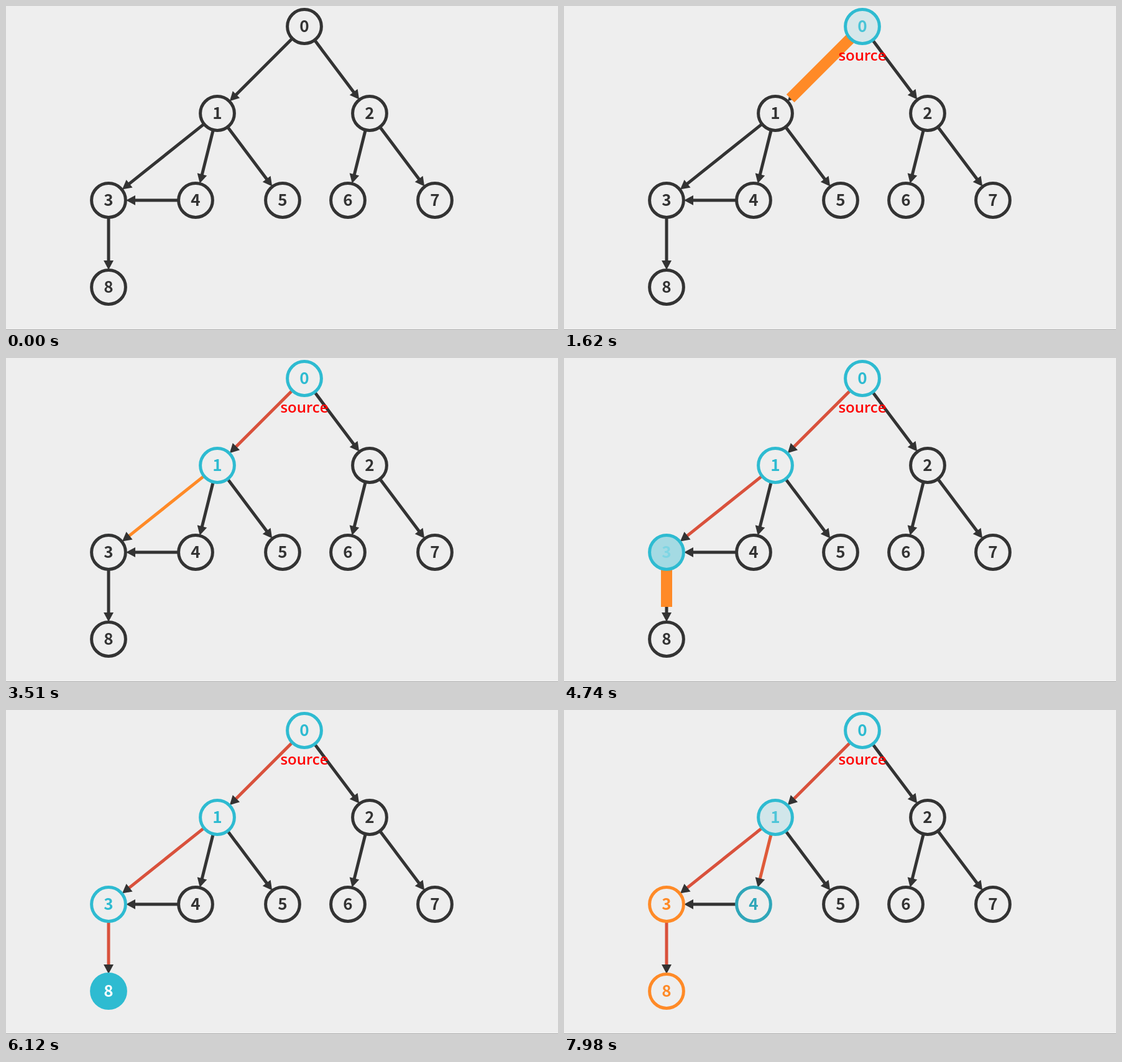
Recreate the animation shown at these times as an HTML page. Size 888 by 522 pixels, loop 8 s.

```html
<!DOCTYPE html>
<html lang="en">
<head>
<meta charset="utf-8">
<title>Depth-first search</title>
<style>
  html, body { margin: 0; width: 100%; height: 100%; overflow: hidden; background: #eee; }
  svg { display: block; width: 888px; height: 522px; }
  text { text-anchor: middle; }
  .digit { font: 700 26px "PT Sans", "Noto Sans CJK JP", "Noto Sans CJK SC", Lato, sans-serif; }
  .label { font: 600 24px "Open Sans", "Noto Sans", sans-serif; fill: #f00; }
</style>
</head>
<body>
<svg id="stage" viewBox="0 0 888 522"></svg>
<script>
const LOOP = 8000, FADE = 500, LABEL_TIME = 785;
const START_GAP = 27, TIP_GAP = 28, OVERSHOOT = 14;

const BG = [238, 238, 238], DARK = [51, 51, 51], WHITE = [255, 255, 255];
const CYAN = [46, 187, 209], ORANGE = [255, 138, 39], RED = [217, 81, 60];

// fill, stroke, text
const LOOKS = {
  plain: [BG, DARK, DARK],
  active: [CYAN, CYAN, WHITE],
  visited: [BG, CYAN, CYAN],
  done: [BG, ORANGE, ORANGE]
};

const NODES = [[480, 33], [340, 173], [585, 173], [165, 313], [305, 313],
  [445, 313], [550, 313], [690, 313], [165, 453]];
const EDGES = ['0-1', '0-2', '1-3', '1-4', '1-5', '2-6', '2-7', '4-3', '3-8'];

const STEPS = [
  { at: 775, nodes: { 0: 'active' } },
  { at: 1280, nodes: { 0: 'visited' }, trace: '0-1' },
  { at: 1800, nodes: { 1: 'visited' }, keep: '0-1' },
  { at: 2340, nodes: { 1: 'active' } },
  { at: 2885, nodes: { 1: 'visited' }, trace: '1-3' },
  { at: 3450, nodes: { 3: 'visited' }, keep: '1-3' },
  { at: 3950, nodes: { 3: 'active' } },
  { at: 4470, nodes: { 3: 'visited' }, trace: '3-8' },
  { at: 5070, nodes: { 8: 'visited' }, keep: '3-8' },
  { at: 5590, nodes: { 8: 'active' } },
  { at: 6085, nodes: { 8: 'done', 3: 'active' } },
  { at: 6576, nodes: { 3: 'done', 1: 'active' } },
  { at: 7085, trace: '1-4' },
  { at: 7649, nodes: { 4: 'visited', 1: 'visited' }, keep: '1-4' }
];

const stage = document.getElementById('stage');

function add(tag, attrs, content = '') {
  const el = document.createElementNS('http://www.w3.org/2000/svg', tag);
  for (const key in attrs) el.setAttribute(key, attrs[key]);
  el.textContent = content;
  return stage.appendChild(el);
}

const css = c => `rgb(${c.map(Math.round).join(',')})`;
const mix = (a, b, k) => a.map((v, i) => v + (b[i] - v) * k);

// Cubic in-out progress of a transition begun at `start`
function progress(t, start) {
  const p = Math.min(1, Math.max(0, (t - start) / FADE));
  return p < 0.5 ? 4 * p ** 3 : 1 - 4 * (1 - p) ** 3;
}

function makeEdge(name) {
  const [from, to] = name.split('-').map(i => NODES[i]);
  const dx = to[0] - from[0], dy = to[1] - from[1], dist = Math.hypot(dx, dy);
  const ux = dx / dist, uy = dy / dist;
  const point = (along, side = 0) =>
    [from[0] + ux * along - uy * side, from[1] + uy * along + ux * side];
  const tip = dist - TIP_GAP;
  const [x1, y1] = point(START_GAP), [x2, y2] = point(tip - 7);
  const line = add('line', { x1, y1, x2, y2, 'stroke-width': 5 });
  add('polygon', {
    points: [point(tip), point(tip - 15, 8), point(tip - 15, -8)].join(' '),
    fill: css(DARK)
  });
  return {
    name, line, point, x1, y1, length: tip - START_GAP,
    trace: STEPS.find(s => s.trace === name),
    keep: STEPS.find(s => s.keep === name)
  };
}

function makeNode([x, y], id) {
  const circle = add('circle', { cx: x, cy: y, r: 27.4, 'stroke-width': 5 });
  const digit = add('text', { x, y: y + 9, class: 'digit' }, id);
  const changes = STEPS.filter(s => s.nodes && s.nodes[id])
    .map(s => ({ at: s.at, look: LOOKS[s.nodes[id]] }));
  return { circle, digit, changes };
}

const edges = EDGES.map(makeEdge);
for (const edge of edges) {
  if (edge.trace) {
    edge.beam = add('line', { x1: edge.x1, y1: edge.y1, stroke: css(ORANGE), 'stroke-width': 18 });
  }
}
const nodes = NODES.map(makeNode);
const label = add('text', { x: 480, y: 88, class: 'label' }, 'source');
add('rect', { x: 0, y: 521, width: 888, height: 1, fill: '#aaa' });

function drawEdge(edge, t) {
  const kept = edge.keep && t >= edge.keep.at;
  const color = kept ? mix(ORANGE, RED, progress(t, edge.keep.at)) : DARK;
  edge.line.setAttribute('stroke', css(color));
  if (!edge.beam) return;
  const growing = t > edge.trace.at && !kept;
  edge.beam.setAttribute('visibility', growing ? 'visible' : 'hidden');
  const grown = Math.min(edge.length, progress(t, edge.trace.at) * (edge.length + OVERSHOOT));
  const [x, y] = edge.point(START_GAP + grown);
  edge.beam.setAttribute('x2', x);
  edge.beam.setAttribute('y2', y);
}

function drawNode(node, t) {
  let look = LOOKS.plain;
  for (const change of node.changes) {
    const k = progress(t, change.at);
    look = look.map((c, i) => mix(c, change.look[i], k));
  }
  const [fill, stroke, text] = look.map(css);
  node.circle.setAttribute('fill', fill);
  node.circle.setAttribute('stroke', stroke);
  node.digit.setAttribute('fill', text);
}

function draw(t) {
  edges.forEach(edge => drawEdge(edge, t));
  nodes.forEach(node => drawNode(node, t));
  label.setAttribute('visibility', t >= LABEL_TIME ? 'visible' : 'hidden');
}

const began = performance.now();
function tick() {
  draw((performance.now() - began) % LOOP);
  requestAnimationFrame(tick);
}
draw(0);
requestAnimationFrame(tick);
</script>
</body>
</html>
```
